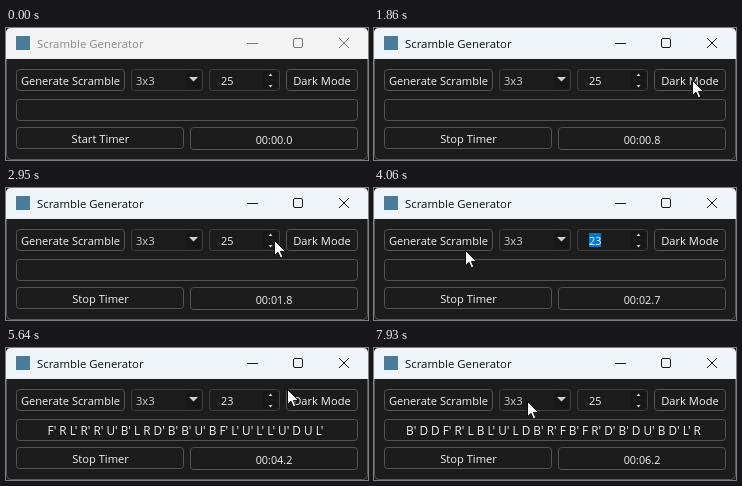
Recreate the animation shown at these times as an HTML page. Size 362 by 132 pixels, loop 8 s.

```html
<!DOCTYPE html>
<html lang="en">
<head>
<meta charset="utf-8">
<title>Scramble Generator</title>
<style>
  html, body { margin: 0; width: 100%; height: 100%; overflow: hidden; background: #1c1c1c; }
  svg { --bg: #1c1c1c; --line: #545454; --dim: #404040; --ink: #f2f2f2; --soft: #cfcfcf; --well: #171717;
        display: block; width: 362px; height: 132px; }
  svg.light { --bg: #f0f0f0; --line: #b9b9b9; --dim: #c8c8c8; --ink: #111; --soft: #333; --well: #e2e2e2; }
  text { font: 11.15px "Open Sans", "Noto Sans", sans-serif; fill: var(--ink); white-space: pre; }
  .mid { text-anchor: middle; }
  .box { fill: var(--bg); stroke: var(--line); }
  .dim { stroke: var(--dim); }
  .well { fill: var(--well); }
  .arrow, #size { fill: var(--soft); }
  #frame { fill: none; stroke: #565a58; }
  #caption { fill: #111; font-size: 11.4px; }
  #bar { fill: #eff4f9; }
  .idle #bar { fill: #f3f3f3; }
  .idle #caption { fill: #8b8b8b; }
  .idle #tools { opacity: .55; }
  #tools { fill: none; stroke: #1a1a1a; }
  #moves { font-size: 11.8px; }
  #clock, #count { font-size: 10.8px; }
  #select { fill: #0078d7; }
</style>
</head>
<body>
<svg id="win" viewBox="0 0 362 132">
  <rect width="362" height="132" fill="var(--bg)"/>
  <rect id="frame" x=".5" y=".5" width="361" height="131" rx="5"/>
  <path id="bar" d="M0 31V5q0-5 5-5h352q5 0 5 5v26z"/>
  <rect x="10" y="8" width="14" height="14" fill="#4b7c9a"/>
  <text id="caption" x="31" y="20">Scramble Generator</text>
  <g id="tools">
    <path d="M241 15.5h11M333 10l10 10M343 10l-10 10"/>
    <rect x="287.5" y="10.5" width="9" height="9" rx="1.5"/>
  </g>

  <g id="boxes"></g>

  <text class="mid" x="64.5" y="57">Generate Scramble</text>
  <text id="size" x="130" y="57">3x3</text>
  <rect class="well" x="181" y="43" width="14" height="18"/>
  <path class="arrow" d="M183 49h9l-4.5 4.5z"/>
  <path class="well" d="M257 43h15v8h-15zM257 53h15v8h-15z"/>
  <path class="arrow" d="M262.5 48h4l-2-2.5zM262.5 57h4l-2 2.5z"/>
  <rect id="select" x="215" y="45" width="12" height="14"/>
  <text id="count" x="215" y="57"></text>
  <text id="mode" class="mid" x="316" y="57"></text>
  <text id="moves" class="mid" x="179.5" y="87"></text>
  <text id="toggle" class="mid" x="94.5" y="115"></text>
  <text id="clock" class="mid" x="268" y="116"></text>

  <path id="cursor" d="M.5 .5v15.2l3.5-3.4 2.4 5.5 2.4-1-2.4-5.4h4.9z"
        fill="#fff" stroke="#000" stroke-width=".9"/>
</svg>
<script>
const LOOP = 8000, RATE = 0.895, MARGIN = 10, GAP = 6, PAUSE = 90;
const $ = id => document.getElementById(id);

function box(x, y, w, h, kind = "") {
  $("boxes").innerHTML += `<rect class="box ${kind}" x="${x + .5}" y="${y + .5}"
    width="${w - 1}" height="${h - 1}" rx="3"/>`;
  return x + w + GAP;
}
let x = box(MARGIN, 41, 109, 22);
x = box(x, 41, 72, 22, "dim");
x = box(x, 41, 71, 22, "dim");
box(x, 41, 72, 22);
box(MARGIN, 71, 342, 22);
box(box(MARGIN, 99, 168, 22), 99, 168, 23);

const scrambles = [
  "F' R L' R' R' U' B' L R D' B' B' U' B F' L' U' L' L' U' D U L'",
  "D' B U' R F' D L' B' U R' D F B' U' D' D R U B D' F' U' L' B R'",
  "B' D D F' R' L B L' U' L D B' R' F B' F R' D' B' D U' B D' L' R"
];

// What a click does to the window's state
const actions = {
  timer: (s, t) => { s.began = t; },
  mode: s => { s.light = !s.light; },
  step: (s, t, by) => { s.count += by; s.selected = true; },
  scramble: s => { s.made++; s.selected = false; }
};
const click = (t, name, by) => ({ t, name, by });

// The pointer reaches each stop at a time, clicks there and glides on
const stop = (t, x, y, ...clicks) =>
  ({ t, x, y, clicks, leave: Math.max(t, ...clicks.map(c => c.t)) + PAUSE });
const stops = [
  stop(390, 150, 131),
  stop(700, 97, 114, click(937, "timer")),
  stop(1780, 318, 52, click(1995, "mode"), click(2500, "mode")),
  stop(2945, 268, 52, click(3150, "step", -1), click(3430, "step", -1)),
  stop(4050, 91, 62),
  stop(4400, 53, 54, click(4620, "scramble")),
  stop(5450, 293, 46),
  stop(5630, 281, 41),
  stop(5800, 264, 43, click(5860, "step", 1), click(6110, "step", 1)),
  stop(6670, 121, 53),
  stop(6960, 81, 54, click(7100, "scramble"), click(7380, "scramble")),
  stop(7920, 153, 53)
];
stops[2].leave = 2815; // lingers after switching back
const clicks = stops.flatMap(s => s.clicks);

const ease = u => u * u * (3 - 2 * u);

function pointer(t) {
  const i = stops.findLastIndex(s => s.t <= t);
  if (i < 0) return null;
  const a = stops[i], b = stops[i + 1] || a;
  const k = t <= a.leave || a === b ? 0 : ease((t - a.leave) / (b.t - a.leave));
  return [a.x + (b.x - a.x) * k, a.y + (b.y - a.y) * k].map(Math.round);
}

function stateAt(t) {
  const s = { began: Infinity, light: false, count: 25, selected: false, made: 0 };
  for (const c of clicks) if (c.t <= t) actions[c.name](s, c.t, c.by);
  return s;
}

function put(id, text) {
  if ($(id).textContent !== text) $(id).textContent = text;
}

function draw(t) {
  const s = stateAt(t), running = t >= s.began, spot = pointer(t);
  const secs = running ? Math.floor((t - s.began) * RATE / 100) / 10 : 0;

  $("win").classList.toggle("idle", !running);
  $("win").classList.toggle("light", s.light);
  put("mode", (s.light ? "Light" : "Dark") + " Mode");
  put("count", String(s.count));
  $("count").style.fill = s.selected ? "#fff" : "";
  $("select").style.display = s.selected ? "" : "none";
  put("moves", s.made ? scrambles[s.made - 1] : "");
  put("toggle", running ? "Stop Timer" : "Start Timer");
  put("clock", "00:" + secs.toFixed(1).padStart(4, "0"));
  $("cursor").style.display = spot ? "" : "none";
  if (spot) $("cursor").setAttribute("transform", `translate(${spot})`);
}

const origin = performance.now();
function tick() {
  draw((performance.now() - origin) % LOOP);
  requestAnimationFrame(tick);
}
tick();
</script>
</body>
</html>
```
